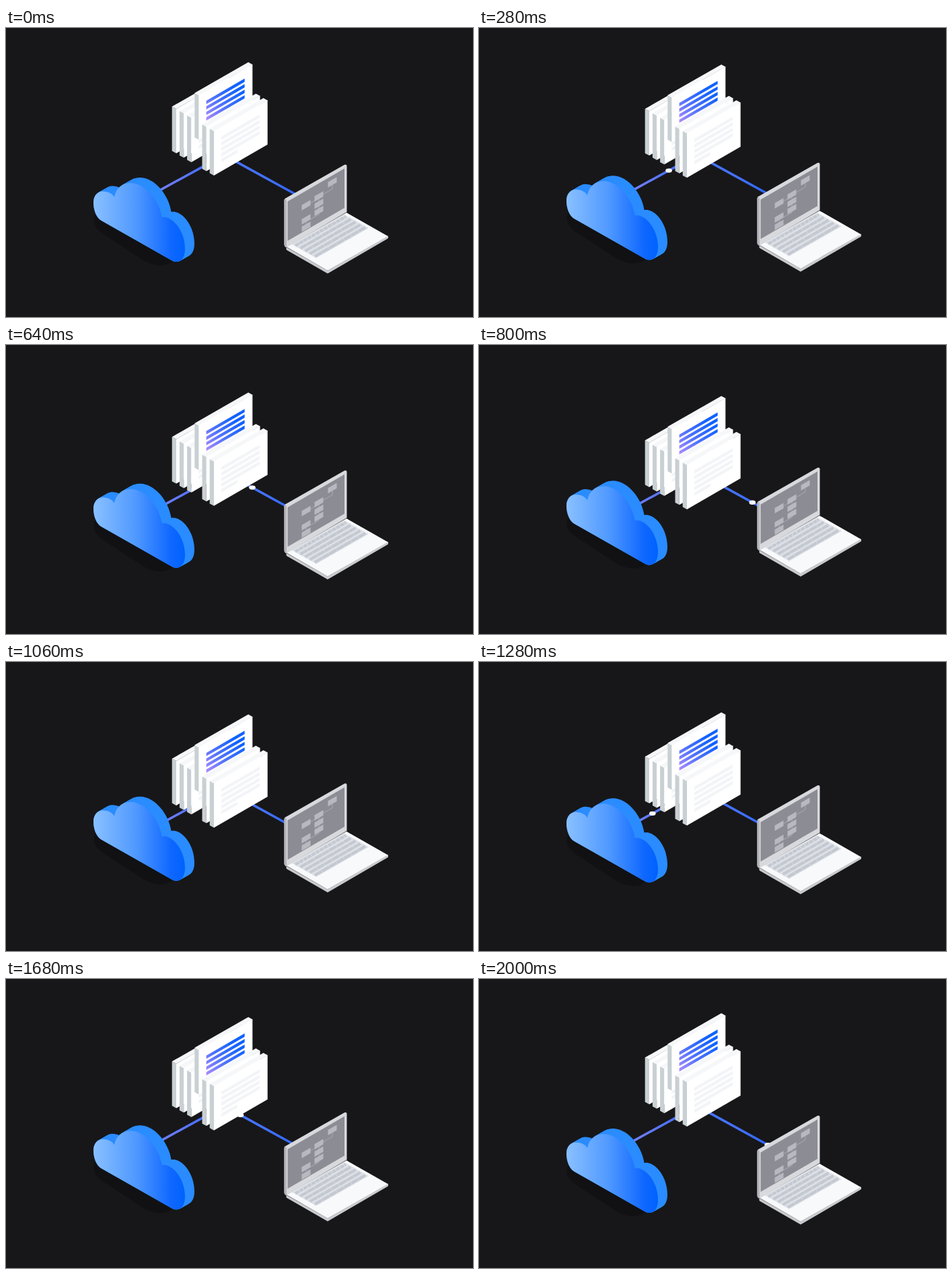
Recreate the animation shown at these times as an HTML page. Size 694 by 429 pixels, loop 2020 ms.

```html
<!DOCTYPE html>
<html lang="en">
<head>
<meta charset="utf-8">
<title>Cloud, documents, laptop</title>
<style>
  html, body { margin: 0; width: 100%; height: 100%; overflow: hidden; background: #171719; }
  svg { display: block; width: 694px; height: 429px; }
</style>
</head>
<body>
<svg id="stage" viewBox="0 0 694 429" xmlns="http://www.w3.org/2000/svg"></svg>
<script>
const LOOP = 2020, PEAK = 1020, SLOPE = 0.577;
const APEX = { x: 324, y: 188.6, slope: 0.548 };
const stage = document.getElementById('stage');

const poly = (points, fill, extra = '') => `<polygon points="${points}" fill="${fill}" ${extra}/>`;
const repeat = (count, draw) => Array.from({ length: count }, (_, i) => draw(i)).join('');
const linkY = x => APEX.y + Math.abs(x - APEX.x) * APEX.slope;

// Parallelogram in the plane that rises to the right.
function slab(x, y, w, h, fill) {
  const rise = w * SLOPE;
  return poly(`${x},${y} ${x + w},${y - rise} ${x + w},${y - rise + h} ${x},${y + h}`, fill);
}

function sheet(x, y, ink) {
  const lines = repeat(5, i => slab(11, 8.2 + i * 8.2, i < 4 ? 57 : 24, 4.9, ink));
  return `<g transform="translate(${x} ${y})">
    ${poly('-6.3,-3.4 0,0 0,66 -6.3,62.6', '#c8d0d3')}
    ${poly('-6.3,-3.4 73.5,-49 79.700,-45.6 0,0', '#f6f7f9')}
    ${slab(0, 0, 79.7, 66, '#ffffff')}${lines}</g>`;
}

function cloud() {
  const shape = `M130 259C130 249 136 242.500 144 242.500C152 242.500 158 246 161 251
    C163 239 172 230 185 230C207 230 228 256 231.500 281
    C247 278 266 301 266 328C266 343 258 350.500 247 345.500L141 285.500C134 281 130 270 130 259Z`;
  const side = repeat(15, i =>
    `<path d="${shape}" fill="#2a8cff" transform="translate(${14 - i} ${(i - 14) * 0.57})"/>`);
  return `<path d="M133 276C128 284 130 295 142 304L203 344C220 355 240 355 250 344L160 285Z" fill="#111113"/>
    ${side}<path d="${shape}" fill="url(#cloudFill)"/>`;
}

function laptop() {
  const boxes = [[485, 229], [465, 250], [465, 261], [465, 271.5], [446, 263], [446, 284], [446, 295]]
    .map(([x, y]) => slab(x - 6.5, y - 0.3, 13, 8, '#b8b9c0')).join('');
  const keys = repeat(5, i => {
    const k = 0.1 + i * 0.2, x = 426.5 + 36 * k, y = 321 + 20 * k;
    const dash = i ? '12 .5' : '6 1';
    return `<path d="M${x} ${y}l75 -43" stroke="#c4c9d1" stroke-width="4.200" stroke-dasharray="${dash}"/>`;
  });
  return `
    ${poly('417,326 478,360.500 567.500,309 567.500,312 478,364 417,329', '#c9cbd0', 'stroke="#c9cbd0" stroke-linejoin="round"')}
    ${poly('417,325 506,274 567.500,309 478,360', '#f8f9fb')}
    ${poly('424.500,321 502,276.500 539,297 461,341.500', '#dde0e6')}
    <g fill="none">${keys}</g>
    <path d="M413.500 256Q413.500 254 415 253L503 203Q506.500 202 506.500 205V273L418 325Q413.500 326 413.500 321Z" fill="#d8d9dd"/>
    <path d="M413.500 256Q413.500 254 415 253L417 256V326Q413.500 325 413.500 321Z" fill="#b4b5ba"/>
    ${poly('418.500,257.500 503,208.500 503,267 418.500,316', '#8c8c95')}
    <path d="M485 231V239L471 247M465 248V272M452 260L459 256M465 274V277L452 284M446 283V295"
      fill="none" stroke="#b0b1b9" stroke-width=".8"/>
    ${boxes}`;
}

function documents() {
  const slot = (i, ink, lift = 0) => sheet(253 + 11.2 * i, 120 + 6.6 * i - lift, ink);
  const faint = '#f3f4f8';
  return repeat(3, i => slot(i, faint)) + slot(3, 'url(#inkFill)', 40) +
    slot(4, faint) + slot(5, faint);
}

const gradient = (id, ends, stops) => `<linearGradient id="${id}" gradientUnits="userSpaceOnUse"
  x1="${ends[0]}" y1="${ends[1]}" x2="${ends[2]}" y2="${ends[3]}">${stops.map(([at, color]) =>
  `<stop offset="${at}" stop-color="${color}"/>`).join('')}</linearGradient>`;

stage.innerHTML = `<defs>
  ${gradient('cloudFill', [130, 0, 266, 0], [[0, '#8ac0ff'], [0.45, '#519aff'], [0.85, '#0f67ff'], [1, '#0062ff']])}
  ${gradient('inkFill', [11, 38, 52, -12], [[0, '#b08cff'], [0.5, '#4f72fa'], [1, '#1062fe']])}
  ${gradient('linkFill', [222, 0, 440, 0], [[0, '#7780f2'], [0.3, '#4b70ff'], [0.75, '#4372ff'], [1, '#2c63fa']])}
  </defs>
  <path d="M220 ${linkY(220)}L${APEX.x} ${APEX.y}L432 ${linkY(432)}" fill="none" stroke="url(#linkFill)" stroke-width="3.500"/>
  <ellipse class="dot" rx="4.800" ry="3.200" fill="#fff"/>
  <ellipse class="dot" rx="4.800" ry="3.200" fill="#fff"/>
  <g id="cloud">${cloud()}</g>
  <g id="laptop">${laptop()}</g>
  <g id="documents">${documents()}</g>`;

const part = id => document.getElementById(id);
const [cloudPart, laptopPart, documentsPart] = ['cloud', 'laptop', 'documents'].map(part);
const dots = stage.querySelectorAll('.dot');

// cubic-bezier(.5, 0, .5, 1)
function ease(x) {
  x = Math.min(1, Math.max(0, x));
  let low = 0, high = 1;
  for (let i = 0; i < 24; i++) {
    const u = (low + high) / 2;
    if (1.5 * u * (1 - u) + u ** 3 < x) low = u; else high = u;
  }
  return low * low * (3 - 2 * low);
}

const shift = (el, y) => el.setAttribute('transform', `translate(0 ${y.toFixed(2)})`);

// Dots speed up slightly on the way from the cloud to the laptop.
function placeDot(dot, age) {
  const x = 223 + 0.2 * age + 3.6e-5 * age * age;
  dot.setAttribute('visibility', age >= 0 && x < 434 ? 'visible' : 'hidden');
  dot.setAttribute('cx', x);
  dot.setAttribute('cy', linkY(x));
}

function render(t) {
  const bob = ease(t < PEAK ? (t - 10) / (PEAK - 10) : (LOOP - t) / (LOOP - PEAK));
  shift(documentsPart, 27 * bob);
  shift(cloudPart, -22.3 * bob);
  shift(laptopPart, -22.5 * bob);
  placeDot(dots[0], t);
  placeDot(dots[1], t - 1112);
}

function tick() {
  render(performance.now() % LOOP);
  requestAnimationFrame(tick);
}
tick();
</script>
</body>
</html>
```
